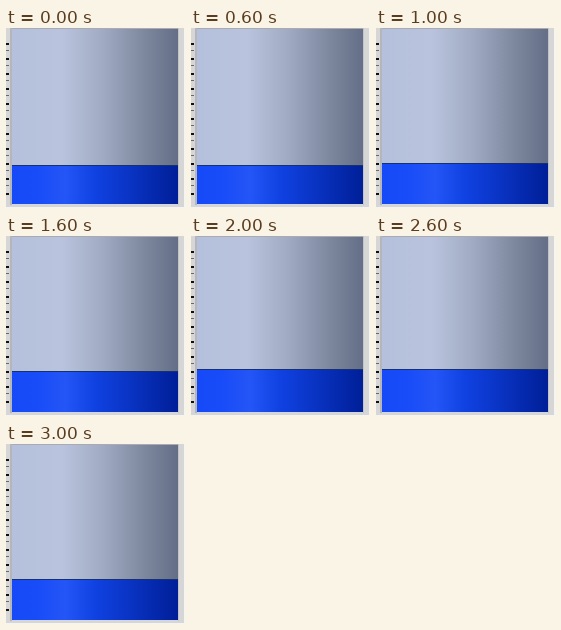
Recreate the animation shown at these times as an HTML page. Size 179 px wide and 180 px high, loop 4000 ms.

```html
<!DOCTYPE html>
<html lang="en">
<head>
<meta charset="utf-8">
<title>Tank level</title>
<style>
html, body { margin: 0; width: 100%; height: 100%; overflow: hidden; background: #d6d6d6; }
svg { display: block; }
</style>
</head>
<body>
<svg width="179" height="180" viewBox="0 0 179 180" shape-rendering="crispEdges">
  <defs>
    <linearGradient id="air">
      <stop offset="0" stop-color="#b5c0dc"/>
      <stop offset=".3" stop-color="#b9c3dd"/>
      <stop offset=".55" stop-color="#a0abc3"/>
      <stop offset=".8" stop-color="#7d889f"/>
      <stop offset="1" stop-color="#646e86"/>
    </linearGradient>
    <linearGradient id="water">
      <stop offset="0" stop-color="#164af8"/>
      <stop offset=".15" stop-color="#184cf8"/>
      <stop offset=".32" stop-color="#2455f6"/>
      <stop offset=".5" stop-color="#1042e2"/>
      <stop offset="1" stop-color="#001f98"/>
    </linearGradient>
  </defs>
  <rect width="179" height="180" fill="#d6d6d6"/>
  <path d="M178.5 0V179.5H0" fill="none" stroke="#f4f4f4"/>
  <rect x="4" width="168" height="1" fill="#a9abb0"/>
  <rect x="4" width="2" height="177" fill="#b4b6ba"/>
  <rect x="172" width="1" height="177" fill="#c2c4c8"/>
  <g id="ticks" fill="#111"></g>
  <rect x="6" y="1" width="166" height="175" fill="url(#air)"/>
  <rect id="fill" x="6" width="166" fill="url(#water)"/>
  <rect id="surface" x="6" width="166" height="1" fill="#17306f"/>
</svg>
<script>
const levels = [137, 135, 133, 135];
const bottom = 176, stepMs = 1000;
const byId = id => document.getElementById(id);
const fill = byId('fill'), surface = byId('surface');

let marks = '';
for (let i = 2; i < 23; i++) {
  const major = i % 2 === 0;
  marks += `<rect y="${Math.floor(i * 7.5)}" width="3" height="${major ? 2 : 1}" opacity="${major ? 1 : .55}"/>`;
}
byId('ticks').innerHTML = marks;

function draw(now) {
  const y = levels[Math.floor(now / stepMs) % levels.length];
  fill.setAttribute('y', y);
  fill.setAttribute('height', bottom - y);
  surface.setAttribute('y', y);
  requestAnimationFrame(draw);
}
draw(performance.now());
</script>
</body>
</html>
```
